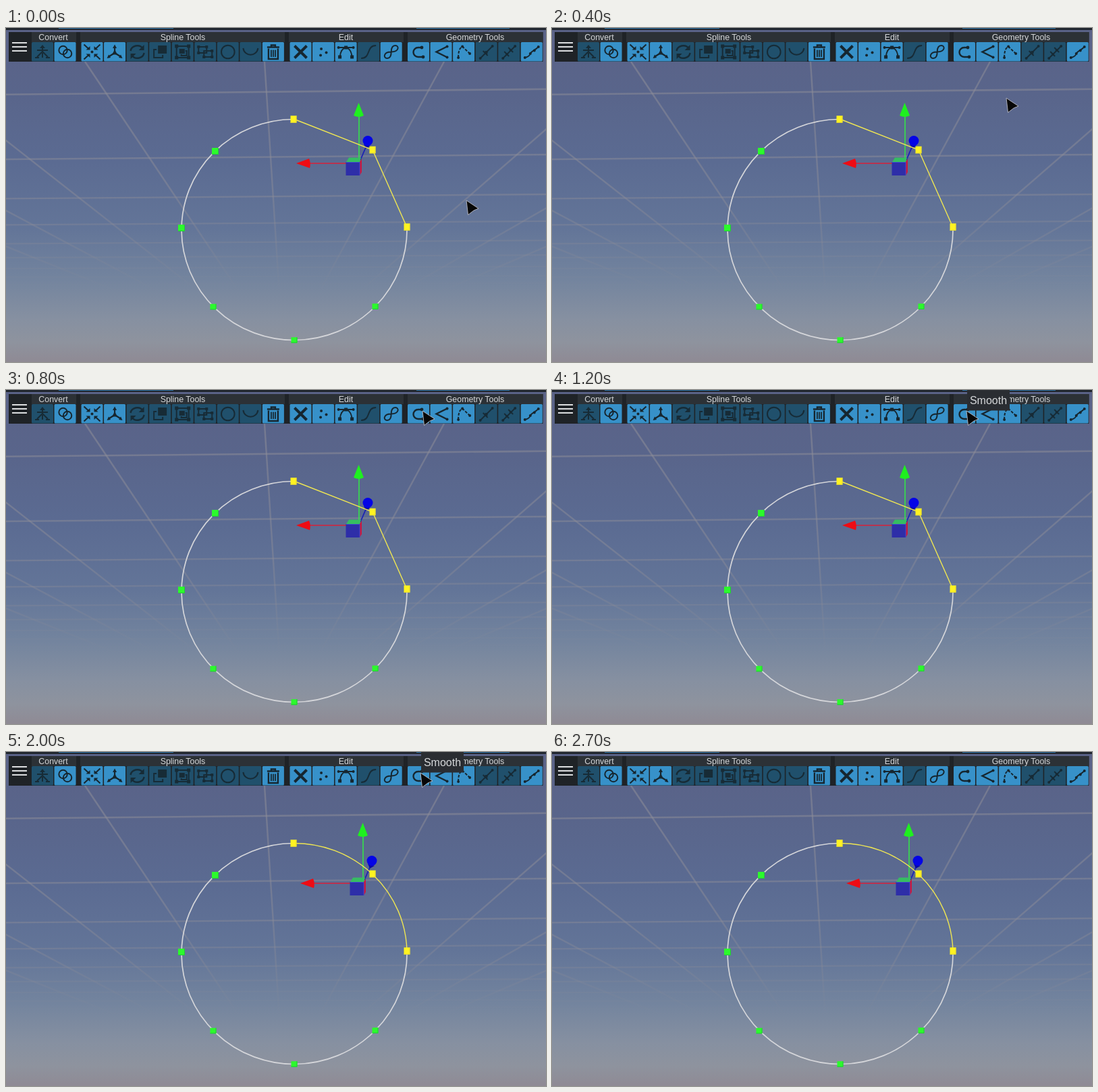
An HTML page that plays this animation: 800x496 px, repeating every 3200 ms.

```html
<!DOCTYPE html>
<html lang="en">
<head>
<meta charset="utf-8">
<title>Smooth spline</title>
<style>
  html, body { margin: 0; width: 100%; height: 100%; overflow: hidden; background: #586285; }
  svg { display: block; width: 800px; height: 496px; }
  text { font-family: "Liberation Sans", Arial, sans-serif; fill: #d6d8da; text-anchor: middle; }
  .icon { fill: none; stroke: #16262f; stroke-width: 2; }
  .icon .solid { fill: #16262f; stroke: none; }
  .off { opacity: .88; }
</style>
</head>
<body>
<svg viewBox="0 0 800 496">
  <defs>
    <linearGradient id="sky" x1="0" y1="0" x2="0" y2="1">
      <stop offset="0" stop-color="#5a6287"/>
      <stop offset=".2" stop-color="#59658b"/>
      <stop offset=".4" stop-color="#5b6b92"/>
      <stop offset=".6" stop-color="#637598"/>
      <stop offset=".75" stop-color="#73849e"/>
      <stop offset=".87" stop-color="#8690a1"/>
      <stop offset=".94" stop-color="#8e939e"/>
      <stop offset="1" stop-color="#8f8a94"/>
    </linearGradient>
    <linearGradient id="fade" gradientUnits="userSpaceOnUse" x1="0" y1="50" x2="0" y2="392">
      <stop offset="0" stop-color="#8c8c97" stop-opacity=".56"/>
      <stop offset=".55" stop-color="#8c8c97" stop-opacity=".48"/>
      <stop offset=".78" stop-color="#8c8c97" stop-opacity=".3"/>
      <stop offset="1" stop-color="#8c8c97" stop-opacity="0"/>
    </linearGradient>
  </defs>
  <rect width="800" height="496" fill="url(#sky)"/>
  <g id="grid" stroke="url(#fade)"></g>

  <path d="M594 296A167 164 0 1 1 426 135.500" fill="none" stroke="#d5d6da" stroke-width="1.7"/>

  <g id="gizmo">
    <path d="M523 131V194" stroke="#35e34a" stroke-width="1.6"/>
    <path d="M522.500 111L530 130Q522.500 134 515 130Z" fill="#1ff01f"/>
    <path d="M449 201H504" stroke="#d81f38" stroke-width="1.5"/>
    <path d="M430 201L449 194Q452 201 450 208Z" fill="#ee0c14"/>
    <path d="M525 196L534 175" stroke="#1b22b4" stroke-width="1.8"/>
    <path d="M530 172L533 179L540 175Z" fill="#0808a8"/>
    <circle cx="536" cy="167.500" r="7.500" fill="#0404e6"/>
    <path d="M504 199L508 192.500H526L524 199Z" fill="#36bd62"/>
    <path d="M524 199L527 194V214L524 219Z" fill="#c81a3e"/>
    <rect x="503.500" y="199" width="20.500" height="20" fill="#2e2ea8"/>
    <path d="M504 199.500H524V219" fill="none" stroke="#3e45d0"/>
  </g>

  <path id="curve" fill="none" stroke="#efe652" stroke-width="1.4"/>
  <g id="knots"></g>

  <rect width="800" height="3" fill="#20262e"/>
  <path d="M78 .5H248M608 .5H746" stroke="#2f75a6"/>
  <rect x="4" y="6" width="791.500" height="44" fill="#1f2327"/>
  <g id="bar"></g>
  <path d="M9 22H31M9 28H31M9 34H31" stroke="#dcdee0" stroke-width="1.800"/>

  <g id="tip">
    <rect x="615" y="0" width="63" height="30.500" fill="#2a2d32"/>
    <text x="646.500" y="21" font-size="16">Smooth</text>
  </g>
  <path id="cursor" d="M0 0L18 12L11 15L2.500 21.500Z" fill="#070707" stroke="#b9bac4" stroke-width=".9" stroke-linejoin="round"/>
</svg>
<script>
const LOOP = 3200, STEP = 100;
const $ = id => document.getElementById(id);

// Ground grid: evenly spaced lines in perspective.
const VX = 411, VY = 490;
let lines = '';
for (let k = 0; k < 9; k++) {
  const y = VY - 1 / (0.00253 + 0.00082 * k), tilt = 4 - k * 0.4;
  lines += `<path d="M0 ${y + tilt}L800 ${y - tilt}" stroke-width="${2.6 - k * 0.1}"/>`;
}
for (let k = -4; k <= 4; k++) {
  lines += `<path d="M${383 + 266 * k} 50L${VX} ${VY}" stroke-width="2.4"/>`;
}
$('grid').innerHTML = lines;

const knot = (fill, edge, w, h) => ([x, y]) =>
  `<rect x="${x - w / 2}" y="${y - h / 2}" width="${w}" height="${h}" fill="${fill}"/>` +
  `<path d="M${x + w / 2 - .5} ${y - h / 2}v${h - .5}h${.5 - w}" fill="none" stroke="${edge}"/>`;
$('knots').innerHTML =
  [[310, 183], [260, 297]].map(knot('#2cfa2c', '#22c838', 10, 10)).join('') +
  [[307, 414], [427, 463.5], [547, 413.5]].map(knot('#2cfa2c', '#22c838', 9, 8.5)).join('') +
  [[426, 135.5], [543, 181], [594, 295.5]].map(knot('#fff321', '#e2d733', 9, 10.5)).join('');

const dot = (x, y, r = 2) => `<circle class="solid" cx="${x}" cy="${y}" r="${r}"/>`;
const ring = (x, y, r) => `<circle cx="${x}" cy="${y}" r="${r}"/>`;
const box = (x, y, w, h, solid) => `<rect x="${x}" y="${y}" width="${w}" height="${h}"${solid ? ' class="solid"' : ''}/>`;
const nodes = (size, ...points) => points.map(([x, y]) => box(x - size / 2, y - size / 2, size, size, true)).join('');
const line = (d, w = 2) => `<path d="${d}" stroke-width="${w}"/>`;
const solid = d => `<path class="solid" d="${d}"/>`;

const icons = {
  split: line('M16 6V14M16 14L8 22M16 14L24 22M8 12H24M16 16V23M5 23H11M21 23H27') + solid('M12 9L16 4L20 9Z'),
  rings: ring(13, 12, 6.2) + ring(19.5, 17, 6.2),
  inward: line('M4 3.500L11 10M28 3.500L21 10M4 25.500L11 19M28 25.500L21 19') + dot(16, 14.5) +
    solid('M13 11.500V6L7 11.500ZM19 11.500V6L25 11.500ZM13 17.500V23L7 17.500ZM19 17.500V23L25 17.500Z'),
  axes: line('M16 16V7M16 16L8 21M16 16L24 21', 2.2) +
    solid('M13 9L16 3.500L19 9ZM4.500 24L7 18.500L10 23ZM27.500 24L25 18.500L22 23ZM16 11L20 18.500H12Z'),
  refresh: line('M6 13A10 9 0 0 1 24 9M26 16A10 9 0 0 1 8 20', 2.4) + solid('M26 4V12H18ZM6 25V17H14Z'),
  copy: box(13, 5, 13, 12, true) + line('M11 11H7V23H20V19'),
  frame: box(7, 6, 18, 17) + box(11, 10, 8, 7, true) + line('M20 13H22V20H14V18') +
    nodes(5, [7, 6], [25, 6], [7, 23], [25, 23]),
  groups: box(6, 7, 12, 9) + box(14, 13, 12, 9) +
    nodes(4, [6, 7], [18, 7], [6, 16], [26, 13], [14, 22], [26, 22]),
  circle: ring(16, 14.5, 9.8),
  arc: line('M5 9C7 22 25 22 27 9'),
  trash: line('M7 7.500H25M13 7V4.500H19V7', 2.4) + line('M9 9.500V25H23V9.500', 2.4) + line('M13 11.500V22M16 11.500V22M19 11.500V22', 1.8),
  cross: line('M7 5.500L25 23.500M25 5.500L7 23.500', 4),
  dots: dot(13, 10) + dot(20.5, 15.5) + dot(12, 19.5),
  bezier: line('M5 8H27M7 22C8 13 11 9 16 8C21 9 24 13 25 22', 1.8) +
    dot(5, 8) + dot(27, 8) + nodes(5, [16, 8], [7, 22], [25, 22]),
  ess: line('M5 24C20 24 12 5 27 5'),
  loop: line('M16 14.500C16 8 18 5 22 5C28 5 28 14.500 16 14.500C4 14.500 4 24 10 24C14 24 16 21 16 14.500Z'),
  bend: line('M20 8H15.500A7 7 0 0 0 15.500 22H23', 2.4) + dot(21, 8, 2.4) + dot(23, 22, 2.4),
  corner: line('M25 6.500L9 14.500L25 22.500', 2.4) + dot(25, 6.5) + dot(25, 22.5),
  dashes: `<path d="M8 23C8 16 9 9 14 6.500L25 17" stroke-dasharray="4 2"/>` + dot(8, 23) + dot(14, 6.5) + dot(25, 17),
  tick: line('M7 24L25 6M11 13L18 20', 1.8) + dot(7, 24) + dot(25, 6) + dot(15.5, 15.5, 2.5),
  ticks: line('M7 24L25 6M9 14L16 21M15 8L22 15', 1.8) + dot(7, 24) + dot(25, 6) + dot(13, 18) + dot(18.5, 12),
  wave: line('M6 23C11 22 13 20 14 17C17 12 20 13 26 7', 1.8) + dot(6, 23) + dot(14, 17) + dot(20, 12.5) + dot(26, 7)
};

// Left edge, right edge, title, title centre, first button, buttons ("-" is disabled).
const groups = [
  [38, 104, 'Convert', 70, 38, '-split rings'],
  [110, 413, 'Spline Tools', 262, 111.5, 'inward axes -refresh -copy -frame -groups -circle -arc trash'],
  [419, 589, 'Edit', 503.5, 420.5, 'cross dots bezier -ess loop'],
  [595, 795.5, 'Geometry Tools', 695, 595, 'bend corner dashes -tick -ticks wave']
];
$('bar').innerHTML = groups.map(([x0, x1, title, cx, first, names]) =>
  `<rect x="${x0}" y="6" width="${x1 - x0}" height="15" fill="#2c3136"/>` +
  `<text x="${cx}" y="17.700" font-size="12.4">${title}</text>` +
  names.split(' ').map((name, i) => {
    const off = name[0] === '-', key = off ? name.slice(1) : name;
    return `<g transform="translate(${first + 33.55 * i} 21)">` +
      `<rect id="${key}" width="32" height="28.500" rx="1.500" fill="${off ? '#20506c' : '#3791c9'}"/>` +
      `<g class="icon${off ? ' off' : ''}">${icons[key]}</g></g>`;
  }).join('')
).join('');

// Pointer position at each step, then at rest on the button.
const trail = [[682, 256], [682, 246], [681, 212], [677, 156], [673, 104], [658, 72],
  [637, 46], [623, 34], [617, 31], [615, 31], [614, 31]];
const CORNER = 'M426 135L543 181L594 296';
const ROUND = 'M426 135.5A167 164 0 0 1 594 296';

function draw(now) {
  const step = Math.floor(now % LOOP / STEP), t = step * STEP;
  const [x, y] = trail[Math.min(step, trail.length - 1)];
  const smooth = t >= 1500;
  $('cursor').setAttribute('transform', `translate(${x} ${y})`);
  $('cursor').style.display = t < 2600 ? '' : 'none';
  $('tip').style.display = t >= 1100 && t < 2600 ? '' : 'none';
  $('bend').setAttribute('fill', t === 1400 ? '#2c78a8' : '#3791c9');
  $('curve').setAttribute('d', smooth ? ROUND : CORNER);
  $('gizmo').setAttribute('transform', smooth ? 'translate(6 -6)' : '');
}

const start = performance.now();
function tick() {
  draw(performance.now() - start);
  requestAnimationFrame(tick);
}
tick();
</script>
</body>
</html>
```
